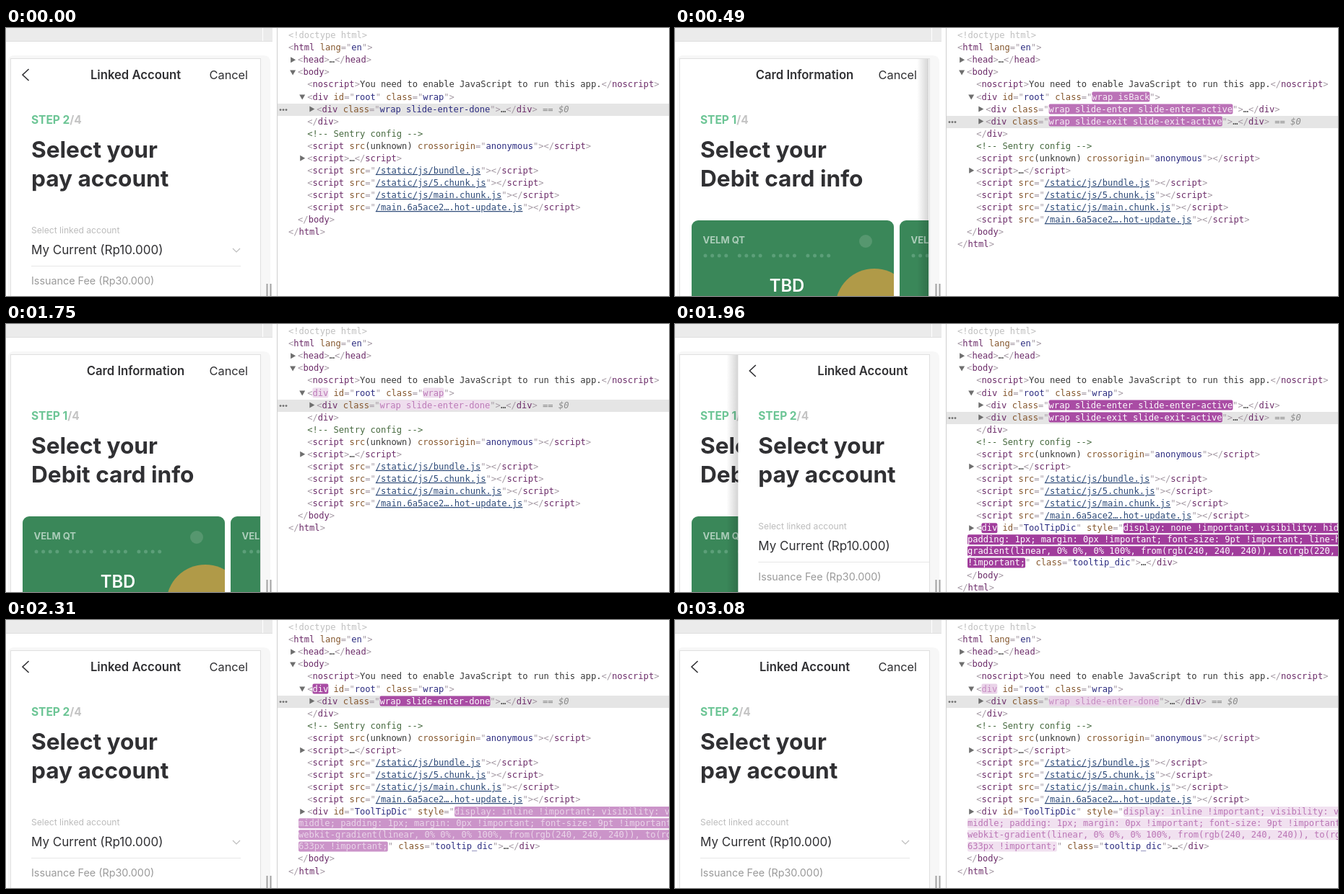
An HTML page that plays this animation: 918 px wide and 372 px high, repeating every 3.15 s.

```html
<!DOCTYPE html>
<html lang="en">
<head>
<meta charset="utf-8">
<title>Slide transition and element tree</title>
<style>
html, body { margin: 0; width: 100%; height: 100%; overflow: hidden; background: #fff; }
svg { display: block; width: 918px; height: 372px; }
text { white-space: pre; }
.app { font-family: Inter, "Noto Sans", sans-serif; fill: #303033; }
.bold { font-weight: 600; }
.heavy { font-weight: 700; }
.tree { font: 12.09px "DejaVu Sans Mono", monospace; }
.punct { fill: #a59aa4; }
.tag { fill: #6b2b68; }
.attr { fill: #84562c; }
.value { fill: #2c2c80; }
.plain { fill: #383838; }
.comment { fill: #46693f; }
.doctype { fill: #c0c0c0; }
.link { fill: #2d4a78; text-decoration: underline; }
.self { fill: #8a8a8a; font-style: italic; }
.arrow { fill: #6e6e6e; }
.mark.main { fill: var(--main-fill); }
.mark.tip { fill: var(--tip-fill); }
tspan.main { fill: var(--main-ink); }
tspan.tip { fill: var(--tip-ink); }
</style>
</head>
<body>
<svg id="stage" viewBox="0 0 918 372">
  <defs>
    <clipPath id="screen"><rect x="7" y="43" width="345" height="329"/></clipPath>
    <clipPath id="card"><rect x="23" y="267" width="280" height="160" rx="9"/></clipPath>
    <linearGradient id="shade">
      <stop offset="0" stop-opacity="0"/>
      <stop offset="1" stop-opacity=".17"/>
    </linearGradient>
  </defs>
  <rect width="918" height="372" fill="#fff"/>
  <path d="M0 0H355V18H0ZM356 0H369V18H356Z" fill="#ebebeb"/>
  <path d="M0 18.5H369" stroke="#e0e0e0"/>
  <path d="M3 372V46Q3 38 12 38H357Q366 38 366 48V372Z" fill="#f7f7f7"/>
  <rect x="6.5" y="42.5" width="346" height="340" fill="#fff" stroke="#e0e0e0"/>

  <g class="app" clip-path="url(#screen)">
    <g id="cardPage"></g>
    <g id="accountPage"></g>
    <rect id="shadow" y="43" width="16" height="329" fill="url(#shade)"/>
  </g>

  <path d="M361.5 355V372M366.5 355V372" stroke="#a2a2a2" stroke-width="2"/>
  <path d="M375.5 0V372" stroke="#d0d0d0"/>
  <g id="tree" class="tree"></g>
</svg>
<script>
const LOOP = 3150, STEP = 70, SLIDE = 300;
const BACK = 210, BACK_DONE = 630, NEXT = 1820, TIP = 1890, NEXT_DONE = 2170;
const CHAR = 7.278, ROW = 17.06;
const $ = id => document.getElementById(id);

// App pages
const label = (x, y, size, text, cls = '', extra = '') =>
  `<text x="${x}" y="${y}" font-size="${size}" class="${cls}" ${extra}>${text}</text>`;

const pageHead = (title, step, line) =>
  '<rect x="7" y="43" width="345" height="329" fill="#fff"/>' +
  label(179.5, 71, 16.65, title, 'bold', 'text-anchor="middle"') +
  label(335, 71, 16.3, 'Cancel', '', 'text-anchor="end"') +
  label(35, 133, 15.5, `<tspan fill="#6cc595">STEP ${step}</tspan><tspan fill="#c4c4c4">/4</tspan>`, 'heavy') +
  label(35, 180, 31.6, 'Select your', 'heavy') +
  label(35, 220, 31.6, line, 'heavy');

function cardFace(x) {
  let dots = '';
  for (let i = 0; i < 16; i++)
    dots += `<circle cx="${42 + Math.floor(i / 4) * 47.3 + (i % 4) * 9.6}" cy="316" r="2.5"/>`;
  return `<g transform="translate(${x})"><g clip-path="url(#card)">
    <rect x="23" y="267" width="280" height="160" fill="#3a8759"/>
    <circle cx="276" cy="388" r="54" fill="#b09a48"/>
    <circle cx="264" cy="296" r="9" fill="#56976f"/>
    <g fill="#5c9f79">${dots}</g>
    ${label(38.5, 298.5, 13, 'VELM QT', 'heavy', 'fill="#abcdb9"')}
    ${label(155, 366, 23.8, 'TBD', 'bold', 'fill="#fff" text-anchor="middle"')}
  </g></g>`;
}

$('cardPage').innerHTML =
  pageHead('Card Information', 1, 'Debit card info') + cardFace(0) + cardFace(288);
$('accountPage').innerHTML =
  pageHead('Linked Account', 2, 'pay account') +
  '<path d="M31.5 57L23 65L31.5 73" fill="none" stroke="#303033" stroke-width="1.6"/>' +
  label(35, 285, 12.1, 'Select linked account', '', 'fill="#bcbcbc"') +
  label(35, 314, 17, 'My Current (Rp10.000)') +
  '<path d="M314 306L319 311L324 306" fill="none" stroke="#bdbdbd" stroke-width="1.2"/>' +
  '<path d="M35 330.5H325" stroke="#e6e6e6"/>' +
  label(35, 356, 14.35, 'Issuance Fee (Rp30.000)', '', 'fill="#9a9a9a"');

// Element tree: a token is [class, text, highlight group]
const punct = s => ['punct', s];
const attr = (name, value, mark, cls = 'value') =>
  [punct(' '), ['attr', name], punct('="'), [cls, value, mark], punct('"')];
const open = (name, attrs = [], mark) =>
  [punct('<'), ['tag', name, mark], ...attrs, punct('>')];
const close = name => [punct('</'), ['tag', name], punct('>')];
const folded = (name, attrs) => [...open(name, attrs), ['plain', '…'], ...close(name)];
const script = src => [...open('script', attr('src', src, '', 'link')), ...close('script')];
const escapeText = s => s.replace(/&/g, '&amp;').replace(/</g, '&lt;').replace(/>/g, '&gt;');

function rowMarkup(x, mid, tokens, arrow) {
  let marks = '', spans = '', col = 0;
  for (const [cls, text, mark] of tokens) {
    if (mark) marks += `<rect class="mark ${mark}" x="${x + col * CHAR}" y="${mid - 7}" width="${text.length * CHAR}" height="14" rx="2"/>`;
    spans += `<tspan class="${mark || cls}">${escapeText(text)}</tspan>`;
    col += text.length;
  }
  const shapes = { right: `M${x - 10} ${mid - 4}l7 4l-7 4z`, down: `M${x - 11} ${mid - 3}h8l-4 7z` };
  return marks + (arrow ? `<path class="arrow" d="${shapes[arrow]}"/>` : '') +
    `<text x="${x}" y="${mid + 4}">${spans}</text>`;
}

const tipStyles = {
  hidden: ['display: none !important; visibility: hidden',
    'padding: 1px; margin: 0px !important; font-size: 9pt !important; line-height',
    'gradient(linear, 0% 0%, 0% 100%, from(rgb(240, 240, 240)), to(rgb(220, 220',
    '!important;'],
  shown: ['display: inline !important; visibility: visible',
    'middle; padding: 1px; margin: 0px !important; font-size: 9pt !important;',
    'webkit-gradient(linear, 0% 0%, 0% 100%, from(rgb(240, 240, 240)), to(rgb(220',
    '633px !important;']
};

function treeMarkup({ rootTag, rootClass = 'wrap', rootMark, sliding, doneMark, tip }) {
  let html = '', mid = 10.2;
  const add = (depth, tokens, arrow, step = ROW) => {
    html += rowMarkup(391 + depth * 13.1, mid, tokens, arrow);
    mid += step;
  };
  const selected = (cls, mark) => {
    html += `<rect x="376" y="${Math.round(mid) - 8}" width="542" height="17" fill="#e5e5e5"/>` +
      [380, 384, 388].map(x => `<circle cx="${x}" cy="${mid + 1}" r="1.4" fill="#6e6e6e"/>`).join('');
    add(3, [...folded('div', attr('class', cls, mark)), ['self', ' == $0']], 'right');
  };

  add(0, [['doctype', '<!doctype html>']]);
  add(0, open('html', attr('lang', 'en')));
  add(1, folded('head'), 'right');
  add(1, open('body'), 'down');
  add(2, [...open('noscript'), ['plain', 'You need to enable JavaScript to run this app.'], ...close('noscript')]);
  add(2, open('div', [...attr('id', 'root'), ...attr('class', rootClass, rootMark)], rootTag), 'down');
  if (sliding) {
    add(3, folded('div', attr('class', 'wrap slide-enter slide-enter-active', 'main')), 'right');
    selected('wrap slide-exit slide-exit-active', 'main');
  } else selected('wrap slide-enter-done', doneMark);
  add(2, close('div'));
  add(2, [['comment', '<!-- Sentry config -->']]);
  add(2, [punct('<'), ['tag', 'script'], ['attr', ' src'], ['plain', '(unknown)'],
    ...attr('crossorigin', 'anonymous'), punct('>'), ...close('script')]);
  add(2, folded('script'), 'right');
  ['/static/js/bundle.js', '/static/js/5.chunk.js', '/static/js/main.chunk.js', '/main.6a5ace2….hot-update.js']
    .forEach(src => add(2, script(src)));
  if (tip) {
    const [first, second, third, last] = tipStyles[tip];
    add(2, [punct('<'), ['tag', 'div', tip === 'hidden' ? 'tip' : ''], ...attr('id', 'ToolTipDic'),
      punct(' '), ['attr', 'style'], punct('="'), ['value', first, 'tip']], 'right', 16.1);
    for (const line of [second, third]) add(1.07, [['value', line, 'tip']], '', 16.1);
    add(1.07, [['value', last, 'tip'], punct('"'), ...attr('class', 'tooltip_dic'), punct('>'),
      ['plain', '…'], ...close('div')]);
  }
  add(1, close('body'));
  add(0, close('html'));
  return html;
}

const phases = [
  { at: 0 },
  { at: BACK, sliding: true, rootClass: 'wrap isBack', rootMark: 'main' },
  { at: BACK_DONE, rootTag: 'main', rootMark: 'main', doneMark: 'main' },
  { at: NEXT, sliding: true },
  { at: TIP, sliding: true, tip: 'hidden', since: NEXT },
  { at: NEXT_DONE, rootTag: 'main', doneMark: 'main', tip: 'shown' }
];

// CSS "ease": solve the Bézier parameter for x, then read y
function ease(x) {
  if (x <= 0) return 0;
  if (x >= 1) return 1;
  const curve = (u, a, b) => 3 * a * u * (1 - u) ** 2 + 3 * b * u * u * (1 - u) + u ** 3;
  let lo = 0, hi = 1;
  for (let i = 0; i < 20; i++) {
    const u = (lo + hi) / 2;
    if (curve(u, .25, .25) < x) lo = u; else hi = u;
  }
  return curve(lo, .1, 1);
}

const tint = (color, amount) =>
  `rgb(${color.map(c => Math.round(255 + (c - 255) * amount))})`;

function setHighlight(name, age) {
  const strength = 1 / (1 + (Math.max(age, 0) / 450) ** 1.8);
  const style = $('stage').style;
  style.setProperty(`--${name}-fill`, tint([158, 54, 153], strength));
  style.setProperty(`--${name}-ink`, tint([136, 18, 128], .8 * (1 - strength) ** 2));
}

let shownPhase;
function render(time) {
  const t = Math.floor((time % LOOP) / STEP) * STEP;
  const phase = phases.filter(p => p.at <= t).pop();
  if (phase !== shownPhase) {
    $('tree').innerHTML = treeMarkup(phase);
    shownPhase = phase;
  }
  setHighlight('main', t - (phase.since ?? phase.at));
  setHighlight('tip', t - TIP);

  const offset = t < NEXT ? ease((t - BACK) / SLIDE) : 1 - ease((t - NEXT) / SLIDE);
  const moving = phase.sliding && offset > .01;
  $('accountPage').setAttribute('transform', `translate(${offset * 345})`);
  $('shadow').setAttribute('x', offset * 345 - 9);
  $('shadow').setAttribute('visibility', moving ? 'visible' : 'hidden');
}

const start = performance.now();
function tick() {
  render(performance.now() - start);
  requestAnimationFrame(tick);
}
tick();
</script>
</body>
</html>
```
